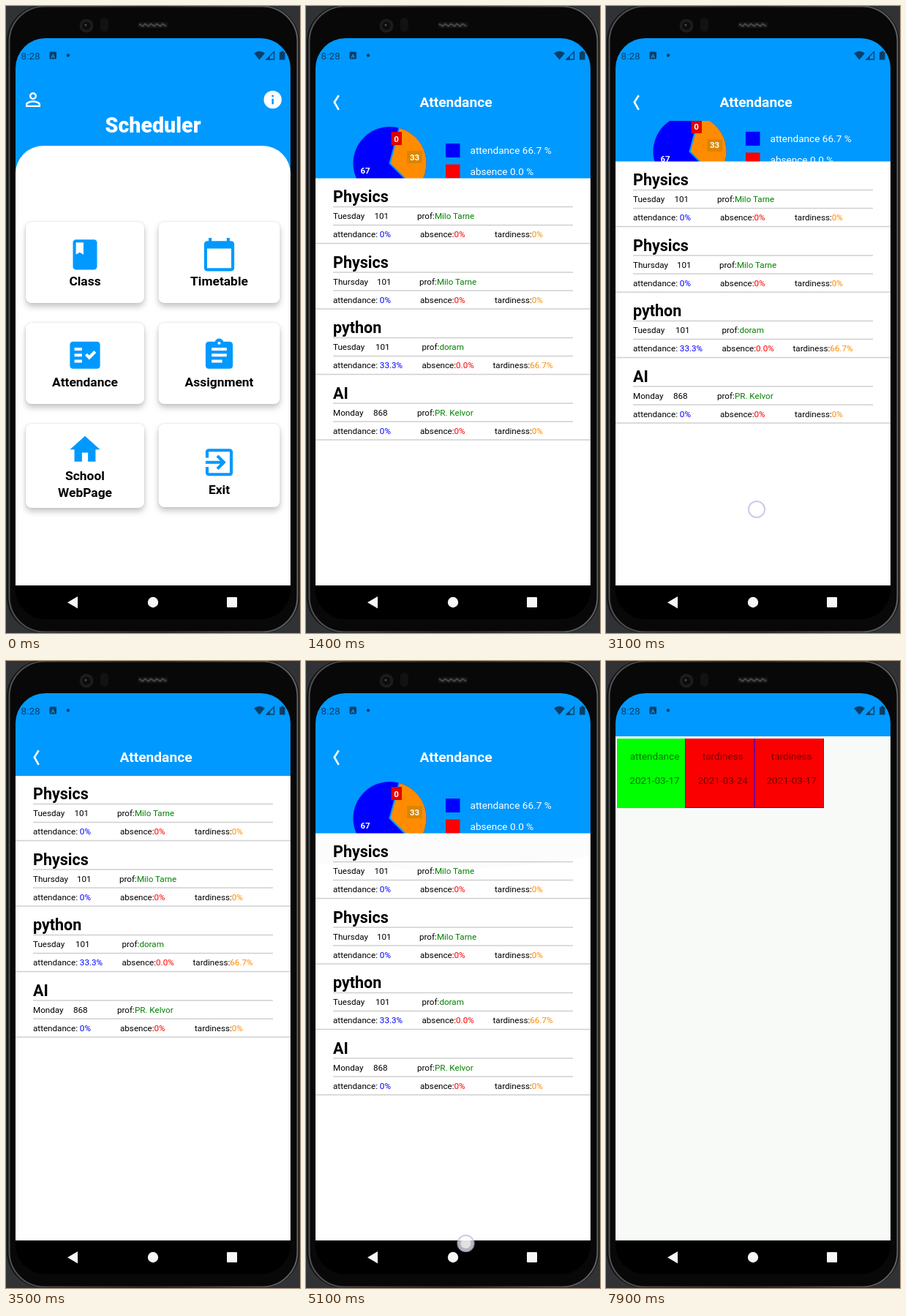
Animation, 402 px wide and 857 px high, one loop 8 s. Source, as an HTML page:

```html
<!DOCTYPE html>
<html lang="en">
<head>
<meta charset="utf-8">
<title>Scheduler</title>
<style>
html, body { margin: 0; width: 100%; height: 100%; overflow: hidden; background: #303236; }
svg { display: block; width: 402px; height: 857px; font-family: Roboto, Arial, sans-serif; }
.b { font-weight: 700; }
.mid { text-anchor: middle; }
.card { fill: #fff; filter: drop-shadow(0 5px 4px rgba(0,0,0,.2)) drop-shadow(0 0 1px rgba(0,0,0,.16)); }
.label { font-size: 17.4px; font-weight: 700; text-anchor: middle; }
.row { font-size: 11.65px; }
.cell { font-size: 13.55px; text-anchor: middle; fill: rgba(0,0,0,.54); }

/* every move advances in 100 ms steps of an 8 s loop (1.25% each) */
.page, .press, #finger, #scrim, #glow {
  animation: 8s step-end infinite;
  transform-origin: 201px 441px;
}
@property --off { syntax: "<number>"; inherits: true; initial-value: 0; }
#home { animation-name: leaveHome; }
#att { animation-name: visitAtt, scroll; }
#detail { animation-name: enterDetail; }
#list { transform: translateY(calc(var(--off) * -1px)); }
#chart { transform: translateY(calc(var(--off) * -.7px)); }
#scrim { animation-name: scrim; }
#glow { animation-name: glow; }
#finger { animation-name: finger; }
#pressCard { animation-name: pressCard; }
#pressRow { animation-name: pressRow; }

@keyframes leaveHome {
  0% { transform: none; opacity: 1; filter: none; }
  12.5% { transform: scale(1.0386); filter: brightness(.935); }
  13.75% { transform: scale(1.047); }
  15% { transform: scale(1.05); }
  17.5%, 100% { transform: none; opacity: 0; filter: none; }
}
@keyframes visitAtt {
  0% { opacity: 0; transform: none; filter: none; }
  12.5% { opacity: 1; transform: scale(.967); }
  13.75% { transform: scale(.991); }
  15% { transform: scale(.998); }
  16.25% { transform: none; }
  82.5% { transform: scale(1.0386); filter: brightness(.935); }
  83.75% { transform: scale(1.047); }
  85% { transform: scale(1.05); }
  86.25%, 100% { opacity: 0; transform: none; filter: none; }
}
@keyframes enterDetail {
  0% { opacity: 0; transform: none; }
  82.5% { opacity: 1; transform: scale(.967); }
  83.75% { transform: scale(.991); }
  85% { transform: scale(.998); }
  86.25%, 100% { opacity: 1; transform: none; }
}
@keyframes scroll {
  0% { --off: 0; }
  28.75% { --off: 55; }
  30% { --off: 79; }
  33.75% { --off: 21; }
  35% { --off: 0; }
  38.75% { --off: 23; }
  40% { --off: 68; }
  41.25% { --off: 79; }
  50% { --off: 46.3; }
  51.25%, 100% { --off: 0; }
}
@keyframes scrim {
  0% { opacity: 0; }
  30% { opacity: .15; }
  31.25% { opacity: .35; }
  32.5% { opacity: .5; }
  33.75% { opacity: .35; }
  35% { opacity: .15; }
  36.25% { opacity: 0; }
  41.25% { opacity: .25; }
  42.5% { opacity: .5; }
  43.75% { opacity: .8; }
  45% { opacity: 1; }
  50% { opacity: .65; }
  51.25% { opacity: .45; }
  52.5% { opacity: .25; }
  53.75% { opacity: .1; }
  55%, 100% { opacity: 0; }
}
@keyframes glow {
  0% { opacity: 0; }
  52.5% { opacity: .03; }
  53.75% { opacity: .05; }
  55% { opacity: .07; }
  56.25% { opacity: .08; }
  61.25% { opacity: .06; }
  62.5% { opacity: .04; }
  63.75% { opacity: .015; }
  75%, 100% { opacity: 0; }
}
@keyframes finger {
  0% { opacity: 0; transform: none; }
  27.5% { opacity: 1; transform: translate(186px, 560px); }
  28.75% { transform: translate(172px, 505px); }
  30% { transform: translate(160px, 450px); }
  31.25% { transform: translate(152px, 405px); }
  32.5% { transform: translate(148px, 385px); }
  33.75% { transform: translate(153px, 443px); }
  35% { transform: translate(171px, 519px); }
  36.25% { transform: translate(195px, 590px); }
  37.5% { transform: translate(205px, 665px); }
  38.75% { transform: translate(206px, 688px); }
  40% { transform: translate(200px, 643px); }
  41.25% { transform: translate(182px, 525px); }
  42.5% { opacity: 1; transform: translate(195px, 345px); }
  43.75% { opacity: 0; }
  47.5% { opacity: 1; transform: translate(222px, 425px); }
  50% { transform: translate(225px, 458px); }
  51.25% { transform: translate(240px, 527px); }
  52.5% { transform: translate(232px, 603px); }
  53.75% { transform: translate(225px, 670px); }
  55% { transform: translate(219px, 725px); }
  56.25% { transform: translate(217px, 760px); }
  57.5% { transform: translate(218px, 783px); }
  58.75% { transform: translate(218px, 798px); }
  61.25% { transform: translate(218.5px, 796px); }
  75% { opacity: 0; }
  95% { opacity: .35; transform: translate(72.5px, 159.5px); }
  96.25% { opacity: .22; }
  97.5% { opacity: .1; }
  98.75%, 100% { opacity: 0; transform: translate(72.5px, 159.5px); }
}
@keyframes pressCard {
  0% { opacity: 0; }
  6.25% { opacity: .03; }
  7.5% { opacity: .07; }
  8.75% { opacity: .1; }
  10% { opacity: .08; }
  11.25% { opacity: .04; }
  12.5%, 100% { opacity: 0; }
}
@keyframes pressRow {
  0% { opacity: 0; }
  75% { opacity: .03; }
  76.25% { opacity: .07; }
  77.5% { opacity: .1; }
  78.75% { opacity: .08; }
  80% { opacity: .04; }
  81.25%, 100% { opacity: 0; }
}
</style>
</head>
<body>
<svg viewBox="0 0 402 857">
  <defs>
    <clipPath id="screen"><rect x="13" y="44" width="376" height="794" rx="41"/></clipPath>
    <clipPath id="below"><rect x="13" y="157" width="376" height="635"/></clipPath>
    <clipPath id="listArea"><rect x="13" y="235.5" width="376" height="556"/></clipPath>
    <linearGradient id="rim" x2="1" y2="0">
      <stop offset="0" stop-color="#505050"/><stop offset=".5" stop-color="#2c2c2c"/><stop offset="1" stop-color="#606060"/>
    </linearGradient>
  </defs>

  <!-- phone body -->
  <rect width="402" height="857" fill="#303236"/>
  <rect x="1" y="-1" width="400" height="858" rx="50" fill="#141414"/>
  <rect x="4.5" y=".5" width="394" height="855" rx="48" fill="#080808" stroke="url(#rim)" stroke-width="2"/>
  <circle cx="110" cy="27" r="9.5" fill="#1c1c1d"/>
  <circle cx="110" cy="27" r="5.5" fill="#0c0c0d"/>
  <circle cx="109" cy="26" r="1.5" fill="#4a4b4d"/>
  <rect x="129" y="16" width="11" height="19" rx="5" fill="#121213"/>
  <rect x="180" y="22" width="42" height="8" rx="4" fill="#141414"/>
  <path d="M182 24.5l5 3l3-3l5 3l3-3l5 3l3-3l5 3l3-3l5 3" fill="none" stroke="#444" stroke-width="2.2"/>

  <g clip-path="url(#screen)">
    <rect x="13" y="44" width="376" height="794"/>

    <g id="home" class="page">
      <rect x="13" y="44" width="376" height="794" fill="#09f"/>
      <path d="M13 792V229A38 38 0 0 1 51 191H351A38 38 0 0 1 389 229V792Z" fill="#fff"/>
      <rect x="13" y="792" width="376" height="46"/>
      <text class="mid" x="201" y="173" font-size="28.6" font-weight="900" fill="#fff">Scheduler</text>
      <path transform="translate(22 113) scale(1.25)" fill="#fff" d="M12 5.9a2.1 2.1 0 1 1 0 4.2 2.1 2.1 0 0 1 0-4.2m0 9c2.97 0 6.1 1.46 6.1 2.1v1.1H5.9V17c0-.64 3.13-2.1 6.1-2.1M12 4a4 4 0 1 0 0 8 4 4 0 0 0 0-8m0 9c-2.67 0-8 1.34-8 4v3h16v-3c0-2.66-5.33-4-8-4"/>
      <circle cx="364.7" cy="128" r="12.2" fill="#fff"/>
      <path d="M364.7 121.8v2.5m0 2.5v7.4" stroke="#09f" stroke-width="2.5"/>
      <g id="cards"></g>
      <rect id="pressCard" class="press" x="27" y="433" width="162" height="111" rx="8" opacity="0"/>
    </g>

    <g id="att" class="page">
      <rect x="13" y="44" width="376" height="748" fill="#09f"/>
      <rect x="13" y="792" width="376" height="46"/>
      <path d="M44.7 122.2L38.8 131.5L44.7 141.8" fill="none" stroke="#fff" stroke-width="2.6"/>
      <text class="b mid" x="205" y="138" font-size="19.2" fill="#fff">Attendance</text>
      <g clip-path="url(#below)">
        <g id="chart">
          <circle cx="114.5" cy="215" r="50" fill="#00f"/>
          <path d="M114.5 215L127.4 166.7A50 50 0 0 1 149.9 250.4Z" fill="#ff8c00"/>
          <path d="M127.7 165.7L114.5 215L151 251.5" fill="none" stroke="#09f" stroke-width="2"/>
          <rect x="138" y="198" width="21" height="17" fill="#dc8500"/>
          <rect x="116.5" y="172" width="14.5" height="18" fill="#e00000"/>
          <g class="b mid" font-size="11.5" fill="#fff">
            <text x="81" y="229">67</text><text x="148.5" y="210.5">33</text><text x="123.5" y="185.5">0</text>
          </g>
          <rect x="191" y="188" width="19.5" height="19" fill="#00f"/>
          <rect x="191" y="216.5" width="19.5" height="19" fill="red"/>
          <g font-size="13.6" fill="#fff">
            <text x="224.5" y="202">attendance 66.7 %</text><text x="224.5" y="231">absence 0.0 %</text>
          </g>
        </g>
        <rect id="scrim" x="13" y="157" width="376" height="79" fill="#3444ff" opacity="0"/>
        <g id="list">
          <rect x="13" y="235.5" width="376" height="700" fill="#fff"/>
          <g id="rows"></g>
          <rect id="pressRow" class="press" x="13" y="414.5" width="376" height="89" opacity="0"/>
        </g>
        <g clip-path="url(#listArea)"><ellipse id="glow" cx="170" cy="205" rx="340" ry="80" opacity="0"/></g>
      </g>
    </g>

    <g id="detail" class="page">
      <rect x="13" y="44" width="376" height="60" fill="#09f"/>
      <rect x="13" y="103" width="376" height="689" fill="#f8faf8"/>
      <rect x="13" y="103" width="376" height="3" fill="#fff"/>
      <rect x="13" y="792" width="376" height="46"/>
      <g id="cells"></g>
    </g>

    <!-- system bars -->
    <g fill="#0b3f68">
      <text x="20.5" y="73" font-size="13.6">8:28</text>
      <rect x="59.5" y="62.5" width="9.5" height="10" rx="1.5"/>
      <text class="b mid" x="64.2" y="70.5" font-size="8" fill="#1b94e8">A</text>
      <circle cx="85" cy="67.5" r="2.2"/>
      <path d="M339 64.5Q346.5 59 354 64.5L346.5 73.5Z"/>
      <path d="M366.5 62.5V73H356Z" fill="none" stroke="#0b3f68" stroke-width="1.3"/>
      <path d="M361 68.5V73.5H355.5Z"/>
      <path d="M374 63h2v-1.5h3.5V63h2v10.5H374Z"/>
    </g>
    <g fill="#f8f8f8">
      <path d="M84 815.2L98 807V823.4Z"/>
      <circle cx="201" cy="815" r="7.2"/>
      <rect x="302" y="808" width="14" height="14" rx="1"/>
    </g>
    <g id="finger" opacity="0">
      <circle r="11" fill="#fff" fill-opacity=".7" stroke="#b9b9e4" stroke-opacity=".75" stroke-width="2"/>
      <circle r="7" fill="#fff" fill-opacity=".6"/>
    </g>
  </g>
</svg>

<script>
const fill = (id, items, draw) => {
  document.getElementById(id).innerHTML = items.map(draw).join("");
};

// x, y, width, height, icon top, icon, label lines with baselines
const cards = [
  [27, 295, 162, 111, 315, "M18 2H6c-1.1 0-2 .9-2 2v16c0 1.1.9 2 2 2h12c1.1 0 2-.9 2-2V4c0-1.1-.9-2-2-2zM6 4h5v8l-2.5-1.5L6 12V4z", [["Class", 382]]],
  [208.5, 295, 166, 111, 315, "M20 3h-1V1h-2v2H7V1H5v2H4c-1.1 0-2 .9-2 2v16c0 1.1.9 2 2 2h16c1.1 0 2-.9 2-2V5c0-1.1-.9-2-2-2zm0 18H4V8h16v13z", [["Timetable", 382]]],
  [27, 433, 162, 111, 452.5, "M20 3H4c-1.1 0-2 .9-2 2v14c0 1.1.9 2 2 2h16c1.1 0 2-.9 2-2V5c0-1.1-.9-2-2-2zM10 17H5v-2h5v2zm0-4H5v-2h5v2zm0-4H5V7h5v2zm4.82 6L12 12.16l1.41-1.41 1.41 1.42L17.99 9l1.42 1.42L14.82 15z", [["Attendance", 519.5]]],
  [208.5, 433, 166, 111, 452.5, "M19 3h-4.18C14.4 1.84 13.3 1 12 1s-2.4.84-2.82 2H5c-1.1 0-2 .9-2 2v14c0 1.1.9 2 2 2h14c1.1 0 2-.9 2-2V5c0-1.1-.9-2-2-2zm-7 0a1 1 0 1 1 0 2 1 1 0 0 1 0-2zm2 14H7v-2h7v2zm3-4H7v-2h10v2zm0-4H7V7h10v2z", [["Assignment", 519.5]]],
  [27, 571, 162, 115, 581.5, "M10 20v-6h4v6h5v-8h3L12 3 2 12h3v8z", [["School", 648], ["WebPage", 671]]],
  [208.5, 571, 166, 114, 599, "M10.09 15.59L11.5 17l5-5-5-5-1.41 1.41L12.67 11H3v2h9.67zM19 3H5a2 2 0 0 0-2 2v4h2V5h14v14H5v-4H3v4a2 2 0 0 0 2 2h14c1.1 0 2-.9 2-2V5c0-1.1-.9-2-2-2z", [["Exit", 667]]]
];
fill("cards", cards, ([x, y, w, h, top, icon, lines]) => {
  const cx = x + w / 2;
  return `<rect class="card" x="${x}" y="${y}" width="${w}" height="${h}" rx="8"/>
    <path transform="translate(${cx - 24.75} ${top}) scale(2.0625)" fill="#09f" fill-rule="evenodd" d="${icon}"/>` +
    lines.map(([s, base]) => `<text class="label" x="${cx}" y="${base}">${s}</text>`).join("");
});

// title, day, room, room x, prof x, name, three rates, absence x, tardiness x
const classes = [
  ["Physics", "Tuesday", 101, 93.5, 152, "Milo Tarne", "0%", "0%", "0%", 156, 258],
  ["Physics", "Thursday", 101, 97, 155, "Milo Tarne", "0%", "0%", "0%", 156, 258],
  ["python", "Tuesday", 101, 95, 158.5, "doram", "33.3%", "0.0%", "66.7%", 158.5, 255.5],
  ["AI", "Monday", 868, 92, 152, "PR. Kelvor", "0%", "0%", "0%", 156, 258]
];
const pair = (x, y, key, val, color) =>
  `<text x="${x}" y="${y}">${key}<tspan fill="${color}">${val}</tspan></text>`;
const rule = (x1, x2, y) => `<path d="M${x1} ${y}H${x2}" stroke="#cfcfcf" stroke-width="1.4"/>`;
fill("rows", classes, ([title, day, room, roomX, profX, name, att, abs, tardy, absX, tardyX], i) =>
  `<g class="row" transform="translate(0 ${i * 89.5})">
    <text class="b" x="37" y="268" font-size="21.5">${title}</text>
    ${rule(37, 365, 274.5)}
    <text x="37" y="291">${day}</text><text x="${roomX}" y="291">${room}</text>
    ${pair(profX, 291, "prof:", name, "#008000")}
    ${rule(37, 365, 299.5)}
    ${pair(37, 316, "attendance: ", att, "#00f")}
    ${pair(absX, 316, "absence:", abs, "red")}
    ${pair(tardyX, 316, "tardiness:", tardy, "#ff8c00")}
    ${rule(13, 389, 324.5)}
  </g>`);

// x, width, text centre, state, date, colour, edge
const days = [
  [15, 93, 66.5, "attendance", "2021-03-17", "#0f0", "none"],
  [108, 95, 159.7, "tardiness", "2021-03-24", "#fb0000", "#80007c"],
  [203, 95, 253.7, "tardiness", "2021-03-17", "#fb0000", "#80007c"]
];
fill("cells", days, ([x, w, cx, state, date, color, edge]) =>
  `<rect x="${x}" y="106" width="${w}" height="95" fill="${color}"/>
   <path d="M${x + .5} 106V200.5H${x + w - .5}V106" fill="none" stroke="${edge}"/>
   <text class="cell" x="${cx}" y="135">${state}</text>
   <text class="cell" x="${cx}" y="168">${date}</text>`);
</script>
</body>
</html>
```
